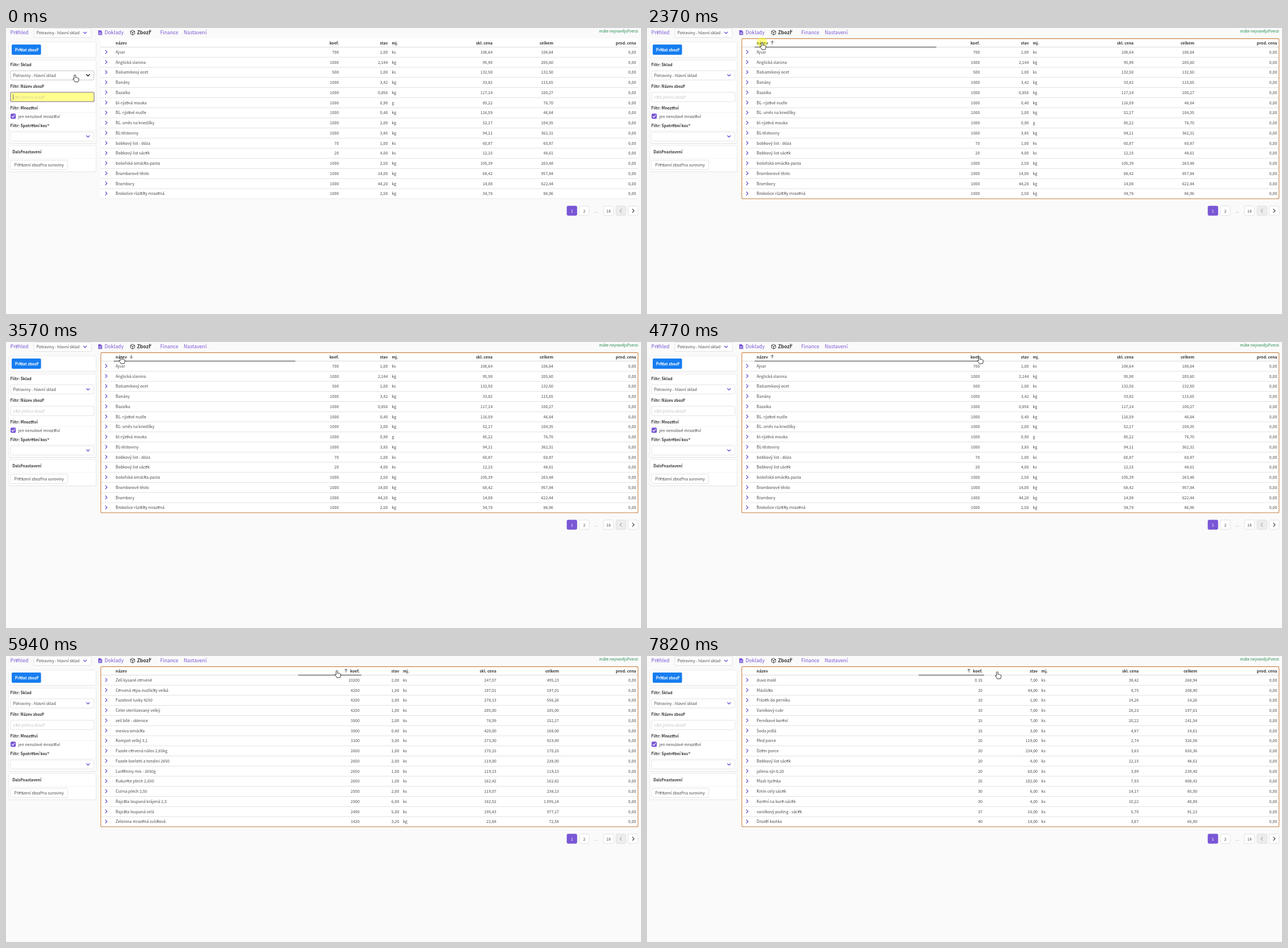
An HTML page for the animation above (8 s loop, 1115 by 502 pixels).

```html
<!DOCTYPE html>
<html lang="cs">
<head>
<meta charset="utf-8">
<title>Sklad</title>
<style>
  html, body { margin: 0; width: 100%; height: 100%; overflow: hidden; background: #fafafa; }
  svg { display: block; width: 100%; height: 100%; }
  text { font: 7px "Noto Sans CJK JP", "Noto Sans CJK SC", "Noto Sans", sans-serif; fill: #4a4a4a; white-space: pre; }
  .nav { font-size: 8.77px; fill: #7957d5; }
  .bold { font-size: 6.85px; font-weight: 600; fill: #363636; }
  .line { fill: none; stroke-linecap: round; stroke-linejoin: round; }
</style>
</head>
<body>
<svg id="stage" viewBox="0 0 1115 502"></svg>
<script>
const PURPLE = '#7957d5', DARK = '#363636', GREY = '#dbdbdb';
const LOOP = 8000;
const stage = document.getElementById('stage');

function add(parent, tag, attrs, content) {
  const el = document.createElementNS('http://www.w3.org/2000/svg', tag);
  for (const key in attrs) el.setAttribute(key, attrs[key]);
  if (content !== undefined) el.textContent = content;
  parent.appendChild(el);
  return el;
}
const group = (parent = stage) => add(parent, 'g', {});
// y is the vertical middle of the capitals
const label = (parent, x, y, str, attrs = {}) => add(parent, 'text', { x, y: y + 2.6, ...attrs }, str);
const box = (parent, x, y, right, bottom, attrs = {}) =>
  add(parent, 'rect', { x, y, width: right - x, height: bottom - y, rx: 2, fill: '#fff', stroke: GREY, 'stroke-width': 0.8, ...attrs });
const stroke = (parent, d, color, width = 1, attrs = {}) =>
  add(parent, 'path', { d, class: 'line', stroke: color, 'stroke-width': width, ...attrs });
const chevronDown = (x, y, color = PURPLE) => stroke(stage, `M${x - 2.6} ${y - 1.3}l2.6 2.6 2.6-2.6`, color, 1.4);
const rule = (parent, x1, x2, y, color, width = 0.8) =>
  add(parent, 'path', { d: `M${x1} ${y}H${x2}`, stroke: color, 'stroke-width': width });
const show = (el, on) => el.setAttribute('visibility', on ? 'visible' : 'hidden');

// ---- navigation ----
const nav = (x, str, attrs) => label(stage, x, 8.4, str, { class: 'nav', ...attrs });
nav(7.6, 'Přehled');
box(stage, 48.8, 0.4, 149.8, 16.6);
label(stage, 53.6, 8.6, 'Potraviny - hlavní sklad');
chevronDown(138.8, 8.5);
add(stage, 'path', { d: 'M162 4h4.2l2.6 2.6V12.2H162Z', fill: PURPLE });
stroke(stage, 'M163.6 8.2h3.6M163.6 10.2h3.6', '#fff', 0.7);
nav(173, 'Doklady');
stroke(stage, 'M222.3 4l3.6 1.9v4.3l-3.6 1.9-3.6-1.9V5.9ZM218.7 5.9l3.6 1.9 3.6-1.9M222.3 7.8v4.3', DARK, 0.9);
nav(230, 'Zboží', { style: `font-weight:600;fill:${DARK};font-size:8.6px` });
nav(270.7, 'Finance');
nav(312, 'Nastavení');
label(stage, 1110, 5.4, 'máte nejnovější verzi', { 'text-anchor': 'end', style: 'fill:#21894a;font-weight:500' });

// ---- side panel ----
for (const [top, bottom] of [[24.5, 51.3], [56.5, 202], [206.5, 252]]) {
  box(stage, 5, top + 0.8, 158.4, bottom + 0.8, { stroke: '#ececec', fill: '#ececec' });
  box(stage, 5, top, 158, bottom, { stroke: '#e6e6e6', 'stroke-width': 0.6 });
}
for (const y of [148.4, 179.8, 229]) rule(stage, 5, 158, y, '#f0f0f0');
box(stage, 10, 29, 61.5, 47, { fill: '#167df0', stroke: 'none' });
label(stage, 35.8, 38.2, 'Přidat zboží', { class: 'bold', 'text-anchor': 'middle', style: 'fill:#fff' });
const title = (y, str) => label(stage, 7.6, y, str, { class: 'bold' });
title(64, 'Filtr: Sklad');
title(102.2, 'Filtr: Název zboží');
title(140.2, 'Filtr: Množství');
title(171.4, 'Filtr: Spotřební koš');
label(stage, 11.2, 217.6, 'Další nastavení', { class: 'bold' });

const storeSelect = box(stage, 8, 75, 154.4, 91.2);
label(stage, 12.4, 83.3, 'Potraviny - hlavní sklad');
const storeChevron = chevronDown(144, 83);
const search = box(stage, 8, 112.8, 154.8, 129.2);
const placeholder = label(stage, 12.6, 121.2, 'část jména zboží');
const caret = stroke(stage, 'M12.6 116.4v9.4', '#444', 0.7);
box(stage, 8, 150.2, 17.2, 159.4, { fill: PURPLE, stroke: 'none' });
stroke(stage, 'M10.2 155l1.8 1.8 3.2-3.8', '#fff', 1.1);
label(stage, 21.6, 155, 'jen nenulové množství');
box(stage, 8, 182.3, 154.4, 198.4);
chevronDown(144, 190.3);
box(stage, 8, 232, 108.2, 248.4);
label(stage, 58, 240.4, 'Přiřazení zboží na suroviny', { 'text-anchor': 'middle' });

// ---- pagination ----
const pageButton = (x, right, str, attrs, style = '') => {
  box(stage, x, 312.4, right, 329, attrs);
  label(stage, (x + right) / 2, 321, str, { 'text-anchor': 'middle', style });
};
pageButton(985, 1002.4, '1', { fill: PURPLE, stroke: PURPLE }, 'fill:#fff');
pageButton(1006.8, 1024, '2');
label(stage, 1036.6, 321, '...', { 'text-anchor': 'middle', style: 'fill:#aaa;font-size:8px' });
pageButton(1049, 1066.8, '18');
pageButton(1071.2, 1088.4, '', { fill: '#ededed' });
pageButton(1092.4, 1109.8, '');
stroke(stage, 'M1081 317.9l-2.9 2.9 2.9 2.9', '#a5a5a5', 1.1);
stroke(stage, 'M1100 317.9l2.9 2.9-2.9 2.9', DARK, 1.2);

// ---- tables ----
const parse = str => str.trim().split('\n').map(line => line.split('|'));
const byName = parse(`
Ajvar|700|1,00|ks|106,64|106,64
Anglická slanina|1000|2,144|kg|95,90|205,60
Balsamikový ocet|500|1,00|ks|132,50|132,50
Banány|1000|3,42|kg|33,82|115,65
Bazalka|1000|0,856|kg|117,14|100,27
BL- rýžové nudle|1000|0,40|kg|116,59|46,64
BL- směs na knedlíky|1000|2,00|kg|52,17|104,35
bl-rýžová mouka|1000|0,90|g|85,22|76,70
BL-těstoviny|1000|3,85|kg|94,11|362,31
bobkový list - dóza|70|1,00|ks|60,87|60,87
Bobkový list sáček|20|4,00|ks|12,15|48,61
boloňská omáčka-pasta|1000|2,50|kg|105,39|263,48
Bramborové těsto|1000|14,00|kg|68,42|957,84
Brambory|1000|44,20|kg|14,08|622,44
Brokolice růžičky mražená|1000|2,50|kg|34,78|86,96`);
const byNameDesc = parse(`
Žampiony plátky mražené|1000|3,10|kg|33,17|102,83
Šunka|1000|0,005|kg|92,05|0,46
Špenát mražený sekaný|1420|3,50|kg|26,22|91,78
Špecle|1000|2,00|kg|121,29|242,58
Špagety|1000|5,00|kg|47,45|237,23
Čínské zelí|1000|2,70|kg|16,75|45,22
Čočkové nudličky|1000|2,00|kg|265,00|530,00
Čočka červená|1000|8,60|kg|79,92|687,29
Čočka velkozrná zelená|1000|7,60|kg|55,33|420,48
Čokoládová pěna|1000|2,00|kg|295,00|590,00
Česnek granulovaný|1000|0,30|kg|480,36|144,11
Česnek|1000|0,46|kg|70,38|32,37
Červená řepa-nudličky velká|4250|1,00|ks|197,01|197,01
Červená řepa kostky|720|8,00|ks|26,55|212,41
Čaj malý|50|8,00|ks|14,92|119,39`);
const byRatioDesc = parse(`
Zelí kysané červené|10200|2,00|ks|247,57|495,13
Červená řepa-nudličky velká|4250|1,00|ks|197,01|197,01
Fazolové lusky 4250|4250|2,00|ks|278,13|556,26
Celer sterilizovaný velký|4250|1,00|ks|205,00|205,00
zelí bílé - sklenice|3500|2,00|ks|76,09|152,17
mexico omáčka|3500|0,40|ks|420,00|168,00
Kompot velký 3,1|3100|3,00|ks|273,30|819,89
Fazole červená nálev 2,65kg|2650|1,00|ks|170,15|170,15
Fazole borlotti a tondini 2650|2650|2,00|ks|119,00|238,00
Luštěniny mix - 2650g|2650|1,00|ks|119,13|119,13
Kukuřice plech 2,650|2650|1,00|ks|162,42|162,42
Cizrna plech 2,55|2550|2,00|ks|119,07|238,13
Rajčata loupaná krájená 2,5|2500|6,00|ks|182,52|1 095,14
Rajčata loupaná celá|2490|5,00|ks|195,43|977,17
Zelenina mražená svíčková|1420|3,20|kg|22,68|72,58`);
const byRatio = parse(`
duvo malé|0.15|7,00|ks|38,42|268,94
Máslíčko|10|44,00|ks|4,75|208,90
Prášek do perníku|10|1,00|ks|14,26|14,26
Vanilkový cukr|10|7,00|ks|28,23|197,61
Perníkové koření|15|7,00|ks|20,22|141,54
Soda jedlá|15|3,00|ks|4,87|14,61
Med porce|20|119,00|ks|2,74|326,08
Džem porce|20|234,00|ks|3,63|850,36
Bobkový list sáček|20|4,00|ks|12,15|48,61
jalena-sýr-0,20|20|60,00|ks|3,99|239,40
Müsli tyčinka|25|102,00|ks|7,93|808,41
Kmín celý sáček|30|6,00|ks|14,17|85,00
Koření na kuře-sáček|30|4,00|ks|10,22|40,89
vanilkový puding - sáček|37|16,00|ks|5,70|91,13
Droždí kostka|40|18,00|ks|3,67|66,00`);
const unsorted = byName.slice();
unsorted.splice(5, 0, unsorted.splice(7, 1)[0]);

const HEAD = ['název', 'koef.', 'stav', 'mj.', 'skl. cena', 'celkem', 'prod. cena'];
// cells: text anchors per column; edges: borders of the first three columns
const wideName = { cells: [192.6, 584.4, 670.4, 677.4, 854.4, 961, 1106.4], edges: [189, 508, 588, 674] };
const descName = { cells: [192.6, 598.2, 682, 688.6, 861, 965, 1106.4], edges: [189, 523, 602, 686] };
const descRatio = { cells: [192.6, 620.8, 690.4, 697, 861, 971, 1106.4], edges: [189, 513, 624, 694] };
const ascRatio = { cells: [192.6, 589, 686, 692.6, 863.4, 966.2, 1106.4], edges: [189, 477, 592, 690] };

const PITCH = 17.75, TOP = 33.5;
box(stage, 166, 18.4, 1110, 300, { rx: 1, stroke: 'none' });
rule(stage, 166, 1110, TOP, GREY, 1);
for (let i = 0; i < 15; i++) {
  const y = 42 + i * PITCH;
  if (i < 14) rule(stage, 166, 1110, TOP + (i + 1) * PITCH, GREY);
  stroke(stage, `M174.7 ${y - 2.7}l2.7 2.7-2.7 2.7`, PURPLE, 1.3);
}
rule(stage, 166, 1110, 299.6, '#e6e6e6');

function buildTable(rows, layout) {
  const g = group();
  const line = (cells, y, attrs) => cells.forEach((str, c) =>
    label(g, layout.cells[c], y, str, { ...attrs, 'text-anchor': c === 0 || c === 3 ? 'start' : 'end' }));
  line(HEAD, 26.2, { class: 'bold' });
  rows.forEach((row, i) => line([...row, '0,00'], 42.2 + i * PITCH, {}));
  return g;
}
const states = [
  { from: 0, rows: unsorted, layout: wideName, sorted: -1 },
  { from: 1600, rows: byName, layout: wideName, sorted: 0 },
  { from: 2560, rows: byNameDesc, layout: descName, sorted: 0 },
  { from: 3570, rows: byName, layout: wideName, sorted: 0 },
  { from: 5220, rows: byRatio, layout: ascRatio, sorted: 1 },
  { from: 5900, rows: byRatioDesc, layout: descRatio, sorted: 1 },
  { from: 7610, rows: byRatio, layout: ascRatio, sorted: 1 },
];
for (const s of states) s.group = buildTable(s.rows, s.layout);

const underlines = [0, 1, 2].map(() => rule(stage, 0, 0, TOP, DARK, 1.1));
const arrow = stroke(stage, 'M0 2.7V-2.7M-2.2-.6L0-2.7 2.2-.6', DARK, 0.85);
const focusRing = box(stage, 166.5, 18.6, 1109.7, 299.8, { fill: 'none', stroke: '#cc864a', 'stroke-width': 1.1 });

// ---- pointer ----
const click = add(stage, 'circle', { r: 9, fill: '#ff0', 'fill-opacity': 0.47 });
const pointer = group();
const shape = d => add(pointer, 'path', { d, fill: '#fff', stroke: '#000', 'stroke-width': 0.8, 'stroke-linejoin': 'round' });
const hand = shape('M-1.3 7.4V1Q0-1 1.3 1V5Q2.6 4 3.4 5.2 4.6 4.5 5.2 5.8 6.5 5.4 6.7 6.8V9.2Q6.7 10.8 5.6 12.6H0Q-1.3 10.2-3.5 7.8-3.6 5.8-1.3 7.4Z');
const plain = shape('M0 0V10.4L2.4 8.2 4 11.7 5.6 11 4.1 7.6H7.3Z');

const path = [
  [120, 121, 82], [480, 148, 54], [870, 186, 28], [1130, 202, 25.4],
  [3850, 202, 25.4], [4130, 487, 28], [4340, 600, 30], [4500, 602, 29], [4780, 583, 25.4], [4880, 581, 25.4],
  [6360, 581, 25.4], [6600, 632, 28], [6780, 634, 30], [7070, 617, 29], [7180, 617, 29], [7320, 615, 27.4],
];
const turns = [[2660, 0], [2810, 180], [3640, 180], [3790, 0], [6000, 0], [6120, 180], [7660, 180], [7810, 0]];
const clicks = [[1440, 1600], [2370, 2560], [3380, 3570], [5060, 5220], [5740, 5900], [7430, 7610]];

function sample(keys, t) {
  const next = keys.findIndex(k => k[0] > t);
  if (next === 0) return keys[0].slice(1);
  if (next < 0) return keys[keys.length - 1].slice(1);
  const a = keys[next - 1], b = keys[next], p = (t - a[0]) / (b[0] - a[0]);
  return a.slice(1).map((v, i) => v + (b[i + 1] - v) * p);
}

function render(t) {
  const state = states.filter(s => s.from <= t).pop();
  const { edges, cells } = state.layout;
  for (const s of states) show(s.group, s === state);

  const [x, y] = sample(path, t);
  const onSelect = x > 8 && x < 154 && y > 75 && y < 91;
  const onHead = x > 189 && y > 18 && y < 34;
  pointer.setAttribute('transform', `translate(${x} ${y})`);
  show(hand, onSelect || onHead);
  show(plain, !(onSelect || onHead));
  show(click, clicks.some(([from, to]) => t >= from && t < to));
  click.setAttribute('cx', x);
  click.setAttribute('cy', y);

  storeSelect.setAttribute('stroke', onSelect ? '#b5b5b5' : GREY);
  storeChevron.setAttribute('stroke', onSelect ? '#111' : PURPLE);

  const searching = t < 1440;
  search.setAttribute('fill', searching ? '#ffff8f' : '#fff');
  search.setAttribute('stroke', searching ? '#7d6a9c' : GREY);
  search.setAttribute('stroke-width', searching ? 1.1 : 0.8);
  placeholder.style.fill = searching ? '#d3cf94' : '#c4c4c4';
  show(caret, searching && (t + 300) % 1060 < 530);
  show(focusRing, !searching);

  underlines.forEach((line, c) => {
    // hover is not re-evaluated after the last sort until the pointer moves
    const hover = t < 7610 && onHead && x >= edges[c] && x < edges[c + 1];
    show(line, hover || c === state.sorted);
    line.setAttribute('d', `M${edges[c]} ${TOP}H${edges[c + 1]}`);
  });

  show(arrow, state.sorted >= 0);
  const arrowX = state.sorted === 1 ? cells[1] - 23.8 : 220;
  arrow.setAttribute('transform', `translate(${arrowX} 25.6) rotate(${sample(turns, t)[0]})`);
}

const start = performance.now();
function tick() {
  render((performance.now() - start) % LOOP);
  requestAnimationFrame(tick);
}
tick();
</script>
</body>
</html>
```
